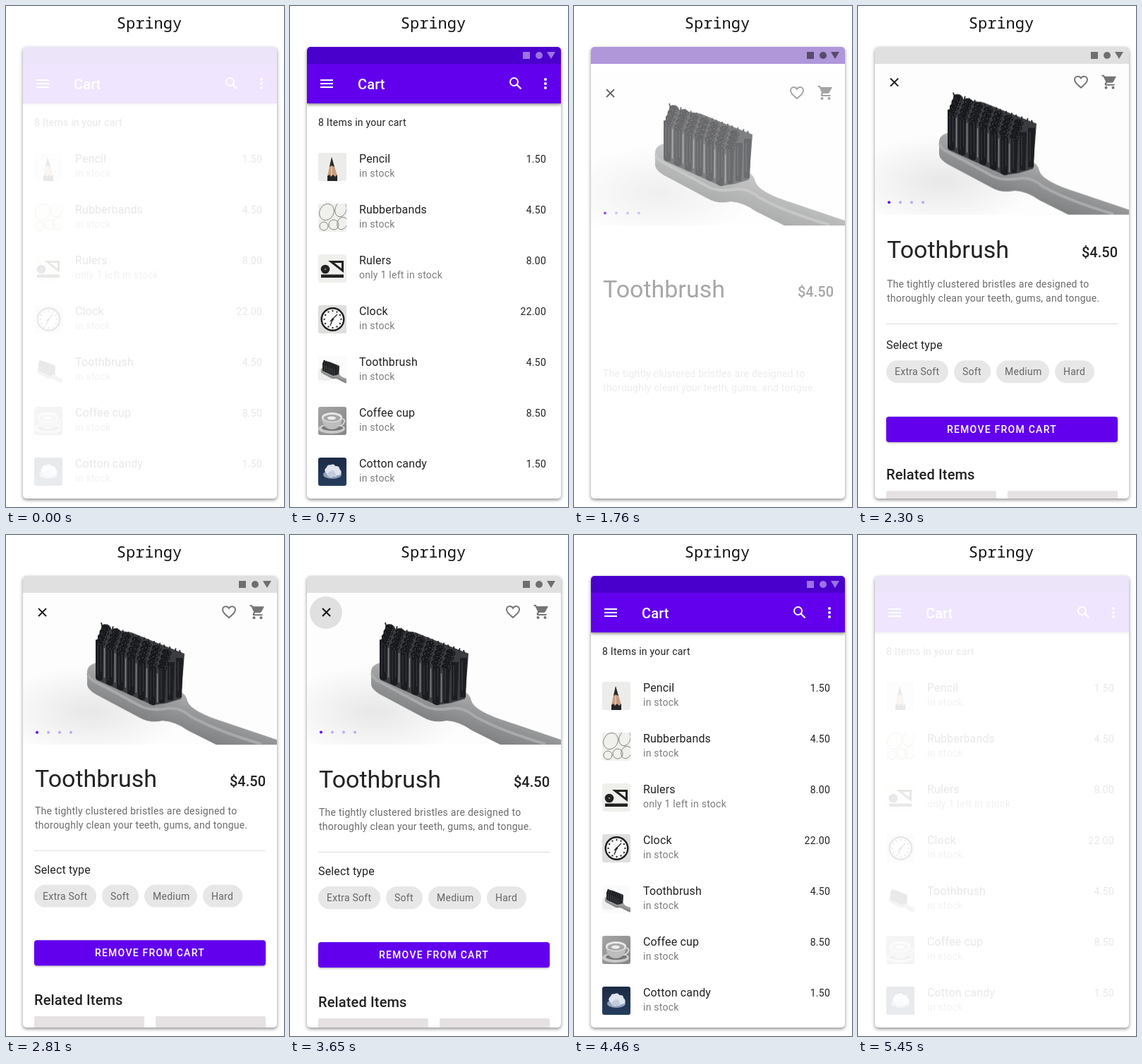
Animation of 394 by 710 pixels, one loop 6.17 s. Source, as an HTML page with a canvas:

```html
<!DOCTYPE html>
<html lang="en">
<head>
<meta charset="utf-8">
<title>Springy</title>
<style>
html, body { margin: 0; width: 100%; height: 100%; overflow: hidden; background: #fff; }
canvas { display: block; width: 394px; height: 710px; }
</style>
</head>
<body>
<canvas id="stage"></canvas>
<script>
const W = 394, H = 710, LOOP = 6170, STEP = 30;
const PURPLE = '#6200ee';
const dpr = window.devicePixelRatio || 1;
const clamp = v => Math.min(1, Math.max(0, v));
const ramp = (t, start, length) => clamp((t - start) / length);
const ease = v => 1 - (1 - v) ** 2;

function setup(canvas) {
  canvas.width = W * dpr;
  canvas.height = H * dpr;
  const c = canvas.getContext('2d');
  c.scale(dpr, dpr);
  return c;
}

function layer(draw) {
  const canvas = document.createElement('canvas');
  draw(setup(canvas));
  return canvas;
}

function text(c, str, x, y, size, color, { weight = 400, spacing = 0, align = 'left', family = 'Roboto, sans-serif' } = {}) {
  c.font = `${weight} ${size}px ${family}`;
  c.letterSpacing = spacing + 'px';
  c.textAlign = align;
  c.fillStyle = color;
  c.fillText(str, x, y);
}

function rect(c, x, y, w, h, color, r = 0) {
  c.fillStyle = color;
  c.beginPath();
  c.roundRect(x, y, w, h, r);
  c.fill();
}

function oval(c, x, y, rx, ry, color, turn = 0) {
  c.fillStyle = color;
  c.beginPath();
  c.ellipse(x, y, rx, ry, turn, 0, 7);
  c.fill();
}
const dot = (c, x, y, r, color) => oval(c, x, y, r, r, color);

function shape(c, d, color) {
  c.fillStyle = color;
  c.fill(new Path2D(d));
}

function stroke(c, d, color, width) {
  c.strokeStyle = color;
  c.lineWidth = width;
  c.stroke(new Path2D(d));
}

function brush(c) {
  const body = c.createLinearGradient(180, 190, 160, 250);
  body.addColorStop(0, '#b4b4b5');
  body.addColorStop(0.6, '#929394');
  body.addColorStop(1, '#808182');
  shape(c, 'M128 181Q115 184 115 194L115 212Q116 219 128 226L190 259Q204 267 222 263Q240 264 258 277L298 297L384 297L384 290L310 265Q262 250 257 235Q254 220 238 222Z', body);
  stroke(c, 'M116 196Q117 204 129 209L192 243Q206 249 226 246Q245 242 262 257Q300 278 362 296', '#a9aaab', 4);
  shape(c, 'M136 128L152 134L178 138L215 153L253 168L248 232L228 238L208 241L128 205L128 152Z', '#3b3c3f');
  for (let i = 0; i < 6; i++) {
    const x = 127 + i * 15, top = 148 + i * 7.2, bottom = 202 + i * 7;
    shape(c, `M${x} ${top}l11 3l-1 ${bottom - top}q-5 3 -10 -2z`, '#1b1c20');
    stroke(c, `M${x + 3} ${top + 8}V${bottom - 3}M${x + 7.5} ${top + 5}V${bottom - 8}`, '#424449', 0.8);
    stroke(c, `M${x + 12.5} ${top + 12}V${bottom}`, '#858689', 1.4);
  }
  for (let i = 0; i < 3; i++) {
    const x = 217 + i * 12, top = 186 - i * 6;
    shape(c, `M${x} ${top}h10l-2 ${52 + i * 2}h-8z`, '#1d1e22');
    stroke(c, `M${x + 3} ${top + 5}v42`, '#4a4c50', 0.8);
  }
  for (let row = 0; row < 4; row++) {
    for (let i = 0; i < 7; i++) {
      const x = 142 + i * 14.3 - row * 2.7 + row * i * 0.1;
      const y = 131 + i * 5.9 + row * 7;
      oval(c, x, y, 7, 4.5, '#17181b', 0.3);
      for (let k = 0; k < 7; k++) {
        const a = k * 2.4 + i;
        rect(c, x + Math.cos(a) * 4.5, y + Math.sin(a) * 2.6, 1.1, 1.1, k % 2 ? '#77797d' : '#45474b');
      }
    }
  }
  for (let i = 0; i < 16; i++) {
    const x = 136 + i * 7.4;
    stroke(c, `M${x} ${128 + i * 2.6}l${i % 3 - 1} -4`, '#202125', 1.8);
  }
}

const thumbs = [
  c => {
    rect(c, 0, 0, 40, 40, '#ececeb');
    shape(c, 'M19 6L13 33L15 40H25L27 33Z', '#c79d80');
    shape(c, 'M19 6L16 20L19 18L23 20Z', '#28282a');
    shape(c, 'M13 33L16 31L18 34L21 31L24 34L27 31V40H13Z', '#242426');
    shape(c, 'M18 20h2v12h-2z', '#dfbda3');
  },
  c => {
    rect(c, 0, 0, 40, 40, '#f0f0ed');
    c.strokeStyle = '#777875';
    c.lineWidth = 0.9;
    for (const [x, y, rx, ry, turn] of [[12, 12, 10, 12, 0.5], [32, 8, 8, 11, 0.3], [8, 32, 6, 6, 0], [22, 30, 7, 7, 0], [34, 28, 7, 9, 0.4]]) {
      c.beginPath();
      c.ellipse(x, y, rx, ry, turn, 0, 7);
      c.stroke();
    }
  },
  c => {
    rect(c, 0, 0, 40, 40, '#efefec');
    dot(c, 10, 21, 6.3, '#222');
    dot(c, 10, 21, 1.2, '#888');
    shape(c, 'M14 9H36V26Z', '#222');
    shape(c, 'M23 12H33V20Z', '#efefec');
    rect(c, 4, 28.5, 32, 4.5, '#222');
  },
  c => {
    rect(c, 0, 0, 40, 40, '#dededd');
    dot(c, 20.5, 20, 17, '#1c1c1c');
    dot(c, 20.5, 20, 14.6, '#fafafa');
    for (let i = 0; i < 12; i++) {
      const a = i * Math.PI / 6;
      dot(c, 20.5 + Math.sin(a) * 12, 20 - Math.cos(a) * 12, 1.2, '#333');
    }
    stroke(c, 'M17 23L27 13M20.5 20L17 29', '#222', 1.3);
    dot(c, 20.5, 20, 1.6, '#222');
  },
  c => {
    rect(c, 0, 0, 40, 40, '#fbfbfb');
    oval(c, 10, 26, 18, 9, '#eeeeee');
    c.translate(-18.1, -18);
    c.scale(0.19, 0.19);
    brush(c);
  },
  c => {
    const g = c.createLinearGradient(0, 0, 40, 40);
    g.addColorStop(0, '#a5a5a5');
    g.addColorStop(1, '#858585');
    rect(c, 0, 0, 40, 40, g);
    oval(c, 19, 31, 19, 7, '#c9c9c9');
    oval(c, 20, 30, 15, 4, '#777');
    stroke(c, 'M32 17q7 0 5 5q-3 5 -8 5', '#d4d4d4', 2);
    shape(c, 'M5 15Q6 32 20 32Q33 31 34 15Z', '#bdbdbd');
    oval(c, 19.5, 15, 14.5, 7, '#e9e9e9');
    oval(c, 19.5, 16, 12, 5, '#a7a7a7');
    oval(c, 19, 16, 6, 2.6, '#eeeeee');
  },
  c => {
    const g = c.createLinearGradient(0, 0, 0, 40);
    g.addColorStop(0, '#1c2b45');
    g.addColorStop(1, '#263d5d');
    rect(c, 0, 0, 40, 40, g);
    oval(c, 20, 24, 13, 6, '#8fa0b8');
    for (let i = 0; i < 9; i++) {
      dot(c, 20 + Math.cos(i * 2.4) * (4 + i * 0.6), 19 + Math.sin(i * 2.4) * 5, 4.4, i % 3 ? '#dfe4ee' : '#c2cbdc');
    }
  }
];

const items = [
  ['Pencil', '1.50'], ['Rubberbands', '4.50'], ['Rulers', '8.00', 'only 1 left in stock'],
  ['Clock', '22.00'], ['Toothbrush', '4.50'], ['Coffee cup', '8.50'], ['Cotton candy', '1.50']
];

const cartLayer = layer(c => {
  c.save();
  c.shadowColor = 'rgba(0,0,0,.45)';
  c.shadowBlur = 4 * dpr;
  c.shadowOffsetY = 2 * dpr;
  rect(c, 24, 82, 360, 56, PURPLE);
  c.restore();
  for (let i = 0; i < 3; i++) rect(c, 43, 104 + i * 5, 18, 2, '#fff');
  text(c, 'Cart', 96, 118, 20, '#fff', { weight: 500, spacing: 0.15 });
  c.beginPath();
  c.arc(317.5, 107.5, 5.5, 0, 7);
  c.strokeStyle = '#fff';
  c.lineWidth = 2;
  c.stroke();
  stroke(c, 'M321.5 111.5L327.5 117.5', '#fff', 2.4);
  for (let i = 0; i < 3; i++) dot(c, 362, 104 + i * 6, 2, '#fff');

  text(c, '8 Items in your cart', 40, 170, 14, '#212121', { spacing: 0.25 });
  items.forEach(([name, price, stock = 'in stock'], i) => {
    const y = 208 + i * 72;
    c.save();
    c.beginPath();
    c.roundRect(40, y, 40, 40, 3);
    c.clip();
    c.translate(40, y);
    thumbs[i](c);
    c.restore();
    text(c, name, 98, y + 14, 16, '#212121', { spacing: 0.15 });
    text(c, stock, 98, y + 34, 14, '#7d7d7d', { spacing: 0.25 });
    text(c, price, 363, y + 14, 14, '#212121', { spacing: 0.25, align: 'right' });
  });
});

const photoLayer = layer(c => {
  c.beginPath();
  c.rect(24, 82, 360, 215);
  c.clip();
  const g = c.createRadialGradient(120, 250, 10, 120, 250, 130);
  g.addColorStop(0, '#e9e9e9');
  g.addColorStop(0.6, '#f5f5f5');
  g.addColorStop(1, '#fdfdfd');
  rect(c, 24, 82, 360, 215, '#fdfdfd');
  c.save();
  c.translate(0, 125);
  c.scale(1, 0.5);
  rect(c, 24, 100, 360, 260, g);
  c.restore();
  brush(c);
});

const ctx = setup(document.getElementById('stage'));
const blit = canvas => ctx.drawImage(canvas, 0, 0, W, H);

const SPRING_START = 1600, DAMPING = 4;
function spring(t, offset, freq) {
  const s = Math.max(0, t - SPRING_START) / 1000, a = freq * s;
  return offset * Math.exp(-DAMPING * s) * (Math.cos(a) + DAMPING / freq * Math.sin(a));
}

// Each group: fade-in start, initial offset, spring frequency, drawing.
const groups = [
  [1630, 25, 6.3, (c, t) => {
    blit(photoLayer);
    const press = ease(ramp(t, 3400, 220));
    if (press) dot(c, 51, 110, 23 * press, '#e0e0e0');
    stroke(c, 'M46 104L57 115M57 104L46 115', '#111', 2);
    c.save();
    c.translate(304, 97);
    stroke(c, 'M12 20C5 14 3 11.8 3 8.5C3 6 5 4 7.5 4C9.5 4 11 5 12 6.7C13 5 14.5 4 16.5 4C19 4 21 6 21 8.5C21 11.8 19 14 12 20Z', '#757575', 2);
    c.translate(40.5, 0);
    shape(c, 'M1 2v2h2l3.6 7.6-1.6 3.4q0 2 2 2h12v-2H7.4l1-2h7.2l1.7-1L21.5 4H5.2l-.9-2z', '#757575');
    dot(c, 7, 20, 2, '#757575');
    dot(c, 17, 20, 2, '#757575');
    c.restore();
    for (let i = 0; i < 4; i++) dot(c, 44 + i * 16, 279.5, 2, i ? '#bfa8f2' : PURPLE);
  }],
  [1680, 72, 3.6, c => {
    text(c, 'Toothbrush', 41, 358, 34, '#212121');
    text(c, '$4.50', 368, 357, 20, '#212121', { weight: 500, align: 'right' });
  }],
  [1735, 166, 3.4, c => {
    text(c, 'The tightly clustered bristles are designed to', 41, 398, 14, '#6b6b6b', { spacing: 0.25 });
    text(c, 'thoroughly clean your teeth, gums, and tongue.', 41, 418, 14, '#6b6b6b', { spacing: 0.25 });
  }],
  [1760, 180, 3.4, c => rect(c, 40, 449, 328, 1, '#dcdcdc')],
  [1780, 195, 3.2, c => {
    text(c, 'Select type', 40, 482, 16, '#212121', { spacing: 0.15 });
    for (const [label, x, w] of [['Extra Soft', 40, 88], ['Soft', 136, 52], ['Medium', 196, 75], ['Hard', 279, 56]]) {
      rect(c, x, 498, w, 32, '#e7e7e7', 16);
      text(c, label, x + 12, 519, 14, '#666', { spacing: 0.25 });
    }
  }],
  [1820, 225, 3.2, c => {
    c.save();
    c.shadowColor = 'rgba(0,0,0,.35)';
    c.shadowBlur = 3 * dpr;
    c.shadowOffsetY = dpr;
    rect(c, 40, 577, 328, 36, PURPLE, 4);
    c.restore();
    text(c, 'REMOVE FROM CART', 204, 600, 14, '#fff', { weight: 500, spacing: 1.25, align: 'center' });
  }],
  [1850, 240, 3.35, c => {
    text(c, 'Related Items', 40, 669, 20, '#212121', { weight: 500, spacing: 0.15 });
    rect(c, 40, 685, 156, 40, '#e6e1e2', 2);
    rect(c, 212, 685, 156, 40, '#e6e1e2', 2);
  }]
];

function statusIcons(alpha, color) {
  ctx.globalAlpha = alpha;
  rect(ctx, 330, 65, 10, 10, color);
  dot(ctx, 353, 70, 5, color);
  shape(ctx, 'M364 65h12l-6 10z', color);
}

function statusBar(mix, alpha) {
  ctx.globalAlpha = alpha;
  const channel = (a, b) => Math.round(a + (b - a) * mix);
  rect(ctx, 24, 58, 360, 24, `rgb(${channel(74, 224)},${channel(0, 224)},${channel(204, 224)})`);
  statusIcons(alpha * 0.45 * clamp(1 - 2 * mix), '#fff');
  statusIcons(0.5 * clamp(2 * mix), '#000');
  ctx.globalAlpha = 1;
}

function rowRipple(t) {
  const grow = ease(ramp(t, 1240, 260));
  if (!grow || t > 1700) return;
  ctx.save();
  ctx.beginPath();
  ctx.rect(24, 485, 360, 72);
  ctx.clip();
  ctx.globalAlpha = 1 - ramp(t, 1520, 120);
  dot(ctx, 204, 521, 190 * grow, '#e0e0e0');
  ctx.restore();
}

function draw(t) {
  ctx.globalAlpha = 1;
  rect(ctx, 0, 0, W, H, '#fff');
  text(ctx, 'Springy', 203, 32, 22, '#111', { align: 'center', family: '"Noto Sans Mono", monospace' });

  ctx.save();
  ctx.shadowColor = 'rgba(0,0,0,.45)';
  ctx.shadowBlur = 5 * dpr;
  ctx.shadowOffsetY = 2 * dpr;
  rect(ctx, 24, 58, 360, 640, '#fff', 5);
  ctx.restore();

  ctx.save();
  ctx.beginPath();
  ctx.roundRect(24, 58, 360, 640, 5);
  ctx.clip();

  const visible = 0.1 + 0.9 * ramp(t, 470, 300) * (1 - ramp(t, 5150, 300));
  const cart = t < 2500 ? 1 - ramp(t, 1530, 110) : ramp(t, 3850, 220);
  const leave = 1 - ramp(t, 3710, 150);

  rowRipple(t);
  ctx.globalAlpha = visible * cart;
  blit(cartLayer);

  for (const [start, offset, freq, paint] of groups) {
    const alpha = ramp(t, start, 200) * leave;
    if (!alpha) continue;
    ctx.save();
    ctx.globalAlpha = alpha;
    ctx.translate(0, spring(t, offset, freq));
    paint(ctx, t);
    ctx.restore();
  }

  statusBar(ramp(t, 1625, 200) * (1 - ramp(t, 3710, 300)), visible);
  ctx.restore();
}

function frame() {
  const t = performance.now() % LOOP;
  draw(Math.max(0, Math.floor((t - 20) / STEP) * STEP + 20));
  requestAnimationFrame(frame);
}
frame();
</script>
</body>
</html>
```
